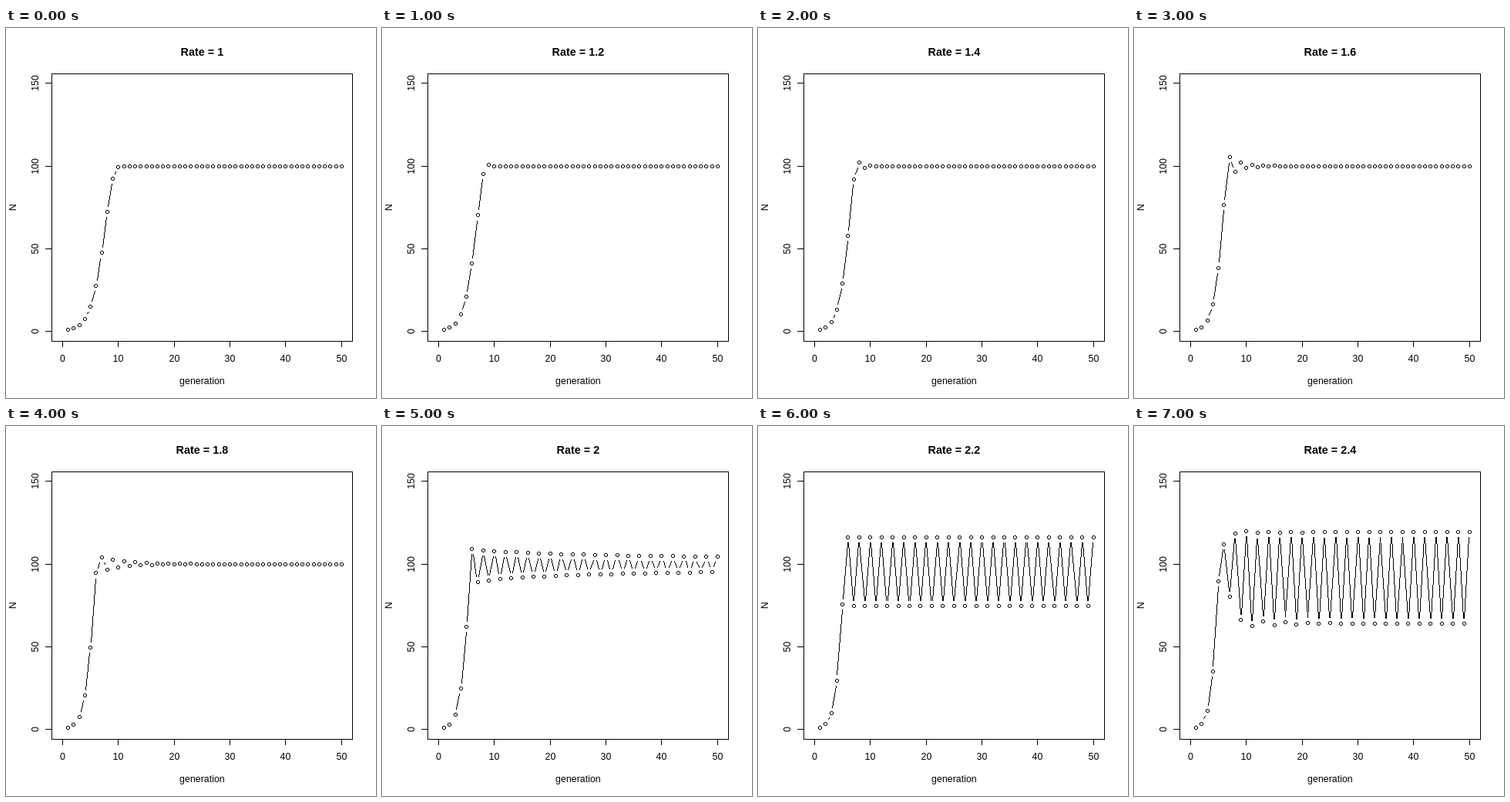
Recreate the animation shown at these times as an HTML page. Size 480 by 480 pixels, loop 8000 ms.

```html
<!DOCTYPE html>
<html lang="en">
<head>
<meta charset="utf-8">
<title>Logistic growth</title>
<style>
  html, body { margin: 0; width: 100%; height: 100%; overflow: hidden; background: #fff; }
  svg { display: block; width: 480px; height: 480px; }
  text { font: 12.4px "Liberation Sans", Arial, sans-serif; text-anchor: middle; fill: #000; }
  #title { font-size: 14.4px; font-weight: bold; }
</style>
</head>
<body>
<svg viewBox="0 0 480 480">
  <rect width="480" height="480" fill="#fff"/>
  <g id="axes" fill="none" stroke="#000" shape-rendering="crispEdges">
    <rect x="59.5" y="59.5" width="390" height="347"/>
  </g>
  <g id="labels"></g>
  <path id="plot" fill="#000" shape-rendering="crispEdges"/>
  <text id="title" x="254.4" y="36"></text>
</svg>
<script>
const NS = "http://www.w3.org/2000/svg";
const STEP = 1000, COUNT = 8, GENERATIONS = 50, CAPACITY = 100;
const GAP = 7.2; // space between a marker's centre and its line
const get = id => document.getElementById(id);
const px = Math.floor;

// Data to stage units: a 4% margin on both axes
const xAt = g => 59.04 + 390.72 * (0.04 + g / 50) / 1.08;
const yAt = n => 406.56 - 347.52 * (0.04 + n / 150) / 1.08;

function add(parent, tag, attrs, text) {
  const el = document.createElementNS(NS, tag);
  for (const k in attrs) el.setAttribute(k, attrs[k]);
  if (text !== undefined) el.textContent = text;
  get(parent).appendChild(el);
}

function label(text, x, y, upright) {
  add("labels", "text", upright ? { x, y } : { transform: `translate(${x} ${y}) rotate(-90)` }, text);
}

function drawAxes() {
  for (let g = 0; g <= 50; g += 10) {
    const x = px(xAt(g)) + 0.5;
    add("axes", "path", { d: `M${x} 406v8` });
    label(g, x, 433, true);
  }
  for (let n = 0; n <= 150; n += 50) {
    const y = px(yAt(n)) + 0.5;
    add("axes", "path", { d: `M51 ${y}h9` });
    label(n, 42, y, false);
  }
  label("generation", 254.4, 462, true);
  label("N", 13, 232.8, false);
}

const box = (x, y, w, h) => `M${x} ${y}h${w}v${h}h${-w}z`;

// Five-pixel ring
function ring(p) {
  const x = px(p.x), y = px(p.y);
  return box(x - 1, y - 2, 3, 1) + box(x - 1, y + 2, 3, 1) +
         box(x - 2, y - 1, 1, 3) + box(x + 2, y - 1, 1, 3);
}

// Hard-edged line, shortened at both ends
function link(a, b) {
  const dx = b.x - a.x, dy = b.y - a.y;
  const f = GAP / Math.hypot(dx, dy);
  if (f >= 0.5) return "";
  const x0 = px(a.x + f * dx), y0 = px(a.y + f * dy);
  const w = px(b.x - f * dx) - x0, h = px(b.y - f * dy) - y0;
  const n = Math.max(Math.abs(w), Math.abs(h));
  let d = "";
  for (let i = 0; i <= n; i++) {
    const k = n ? i / n : 0;
    d += box(Math.round(x0 + w * k), Math.round(y0 + h * k), 1, 1);
  }
  return d;
}

function curve(rate) {
  let d = "", n = 1, last = null;
  for (let g = 1; g <= GENERATIONS; g++) {
    const p = { x: xAt(g), y: yAt(n) };
    d += ring(p);
    if (last) d += link(last, p);
    last = p;
    n += rate * n * (1 - n / CAPACITY);
  }
  return d;
}

let shown = -1;
function render(t) {
  const i = px(t / STEP) % COUNT;
  if (i === shown) return;
  shown = i;
  const rate = (10 + 2 * i) / 10;
  get("title").textContent = "Rate = " + rate;
  get("plot").setAttribute("d", curve(rate));
}

drawAxes();
const start = performance.now();
function tick() {
  render(performance.now() - start);
  requestAnimationFrame(tick);
}
tick();
</script>
</body>
</html>
```
